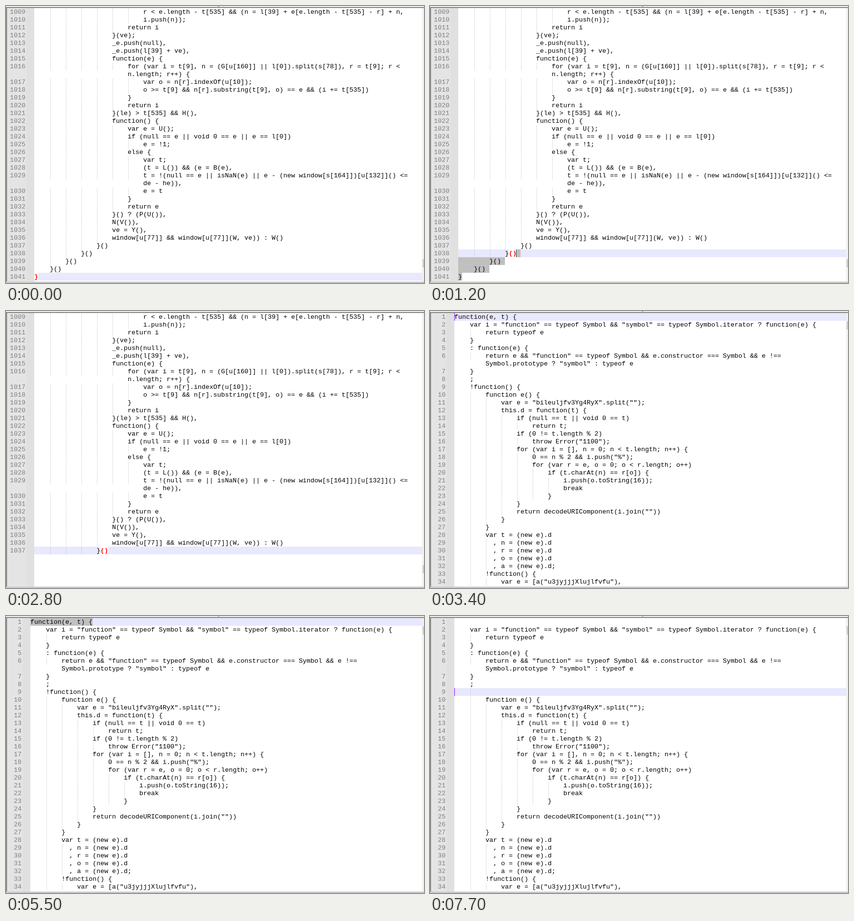
An HTML page with a canvas that plays this animation: 859 by 569 pixels, repeating every 8000 ms.

```html
<!DOCTYPE html>
<html lang="en">
<head>
<meta charset="utf-8">
<title>Code editor</title>
<style>
html, body { margin: 0; width: 859px; height: 569px; overflow: hidden; background: #fff; }
canvas { display: block; }
</style>
</head>
<body>
<canvas id="stage" width="859" height="569"></canvas>
<script>
const ctx = document.getElementById("stage").getContext("2d");
const FONT = '13.333px "Liberation Mono", "Courier New", monospace';
const CELL = 8, ROW = 16, TOP = 4, RIGHT = 855, LOOP = 8000;

// A leading ~ marks the wrapped rest of the line above.
const tail = `                            r < e.length - t[535] && (n = l[39] + e[e.length - t[535] - r] + n,
                            i.push(n));
                        return i
                    }(ve);
                    _e.push(null),
                    _e.push(l[39] + ve),
                    function(e) {
                        for (var i = t[9], n = (G[u[160]] || l[0]).split(s[78]), r = t[9]; r <
~                        n.length; r++) {
                            var o = n[r].indexOf(u[10]);
                            o >= t[9] && n[r].substring(t[9], o) == e && (i += t[535])
                        }
                        return i
                    }(le) > t[535] && H(),
                    function() {
                        var e = U();
                        if (null == e || void 0 == e || e == l[0])
                            e = !1;
                        else {
                            var t;
                            (t = L()) && (e = B(e),
                            t = !(null == e || isNaN(e) || e - (new window[s[164]])[u[132]]() <=
~                            de - he)),
                            e = t
                        }
                        return e
                    }() ? (P(U()),
                    N(V()),
                    ve = Y(),
                    window[u[77]] && window[u[77]](W, ve)) : W()
                }()
            }()
        }()
    }()
}`.split("\n");

const head = `function(e, t) {
    var i = "function" == typeof Symbol && "symbol" == typeof Symbol.iterator ? function(e) {
        return typeof e
    }
    : function(e) {
        return e && "function" == typeof Symbol && e.constructor === Symbol && e !==
~        Symbol.prototype ? "symbol" : typeof e
    }
    ;
    !function() {
        function e() {
            var e = "bileuljfv3Yg4RyX".split("");
            this.d = function(t) {
                if (null == t || void 0 == t)
                    return t;
                if (0 != t.length % 2)
                    throw Error("1100");
                for (var i = [], n = 0; n < t.length; n++) {
                    0 == n % 2 && i.push("%");
                    for (var r = e, o = 0; o < r.length; o++)
                        if (t.charAt(n) == r[o]) {
                            i.push(o.toString(16));
                            break
                        }
                }
                return decodeURIComponent(i.join(""))
            }
        }
        var t = (new e).d
          , n = (new e).d
          , r = (new e).d
          , o = (new e).d
          , a = (new e).d;
        !function() {
            var e = [a("u3jyjjjXlujlfvfu"),`.split("\n");

const clear = (lines, ...rows) => lines.map((s, i) => rows.includes(i) ? "" : s);
const endPage = (lines, thumb) => ({ lines, thumb, first: 1009, left: 58, ink: "#303030" });
const startPage = lines => ({ lines, thumb: 21, first: 1, left: 50, ink: "#8000ff" });

const end = endPage(tail, 520), trimmed = endPage(tail.slice(0, 31), 522);
const start = startPage(head), edit1 = startPage(clear(head, 0)), edit2 = startPage(clear(head, 0, 9));

// time, page, caret row, caret column, caret shown, selection anchor [row, column]
const steps = [
  [0, end, 34, 1, 0],
  [1000, end, 33, 7, 1, [34, 1]],
  [1100, end, 32, 11, 1, [34, 1]],
  [1200, end, 31, 15, 1, [34, 1]],
  [1300, end, 30, 19, 1, [34, 1]],
  [1500, end, 30, 19, 0, [34, 1]],
  [2100, end, 30, 19, 1, [34, 1]],
  [2300, trimmed, 30, 19, 1],
  [2800, trimmed, 30, 19, 0],
  [3400, start, 0, 0, 1],
  [3900, start, 0, 0, 0],
  [4400, start, 0, 0, 1],
  [4900, start, 0, 16, 1],
  [5000, start, 0, 0, 1, [0, 16]],
  [5500, start, 0, 0, 0, [0, 16]],
  [5800, edit1, 0, 0, 1],
  [6300, edit1, 0, 0, 0],
  [6900, edit1, 0, 0, 1],
  [7200, edit1, 9, 17, 1],
  [7300, edit1, 9, 0, 1, [9, 17]],
  [7700, edit2, 9, 0, 1]
];

const box = (color, x, y, w, h) => { ctx.fillStyle = color; ctx.fillRect(x, y, w, h); };
const write = (text, x, y, color, weight = "") => {
  ctx.font = weight + FONT;
  ctx.fillStyle = color;
  ctx.fillText(text, x, y);
};
const indent = s => s ? s.search(/\S|$/) : 0;

function drawFrame(page) {
  box("#f0f0f0", 0, 0, 859, 569);
  box("#a0a0a0", 0, 2, 859, 1);
  box("#696969", 0, 3, 859, 1);
  box("#a0a0a0", 0, 2, 1, 565);
  box("#696969", 1, 3, 1, 563);
  box("#444", 436, 0, 2, 1);
  box("#fff", page.left, TOP, RIGHT - page.left, 562);
  box("#e4e4e4", 2, TOP, page.left - 18, 562);
  box("#e0e0e0", page.left - 16, TOP, 16, 562);
  box("#cdcdcd", 856, page.thumb, 3, 17);
  box("#e3e3e3", 1, 566, 858, 1);
  box("#a0a0a0", 0, 567, 859, 1);
}

function drawGuides(lines, i, left, y) {
  const depth = lines[i] ? indent(lines[i]) : Math.max(indent(lines[i - 1]), indent(lines[i + 1]));
  for (let col = 4; col < depth; col += 4)
    for (let dy = 1; dy < ROW; dy += 2) box("#c0c0c0", left + col * CELL + 1, y + dy, 1, 1);
}

function draw([, page, row, col, shown, anchor]) {
  const { lines, left } = page;
  drawFrame(page);
  box("#e8e8ff", left, TOP + row * ROW, RIGHT - left, ROW);
  let number = page.first;
  lines.forEach((line, i) => {
    const y = TOP + i * ROW, base = y + 12, wrapped = line[0] === "~";
    let text = wrapped ? line.slice(1) : line;
    if (anchor && i >= row && i <= anchor[0]) {
      const from = i === row ? col : 0;
      const to = i === anchor[0] ? anchor[1] : text.length + 1;
      box("#c0c0c0", left + from * CELL, y, (to - from) * CELL, ROW);
    }
    if (!wrapped) {
      const label = String(number++);
      write(label, left - 18 - label.length * CELL, base, "#808080");
      drawGuides(lines, i, left, y);
    }
    const brace = i === row && text.slice(0, col).match(/\(\)$|[{}]$/);
    if (brace) {
      const mark = brace[0], x = left + brace.index * CELL;
      box("#fff", x, y, mark.length * CELL, ROW);
      if (mark === "{") write(mark, x, base, "#800000");
      else write(mark, x, base, "#f00", "bold ");
      text = text.slice(0, brace.index) + " ".repeat(mark.length) + text.slice(col);
    }
    write(text, left, base, "#000");
  });
  if (shown) box(page.ink, left + col * CELL - (col ? 1 : 0), TOP + row * ROW, 1, ROW);
}

let origin, current;
function tick(now) {
  origin ??= now;
  const t = (now - origin) % LOOP;
  const step = steps.findLast(s => s[0] <= t);
  if (step !== current) draw(current = step);
  requestAnimationFrame(tick);
}
draw(steps[0]);
requestAnimationFrame(tick);
</script>
</body>
</html>
```
